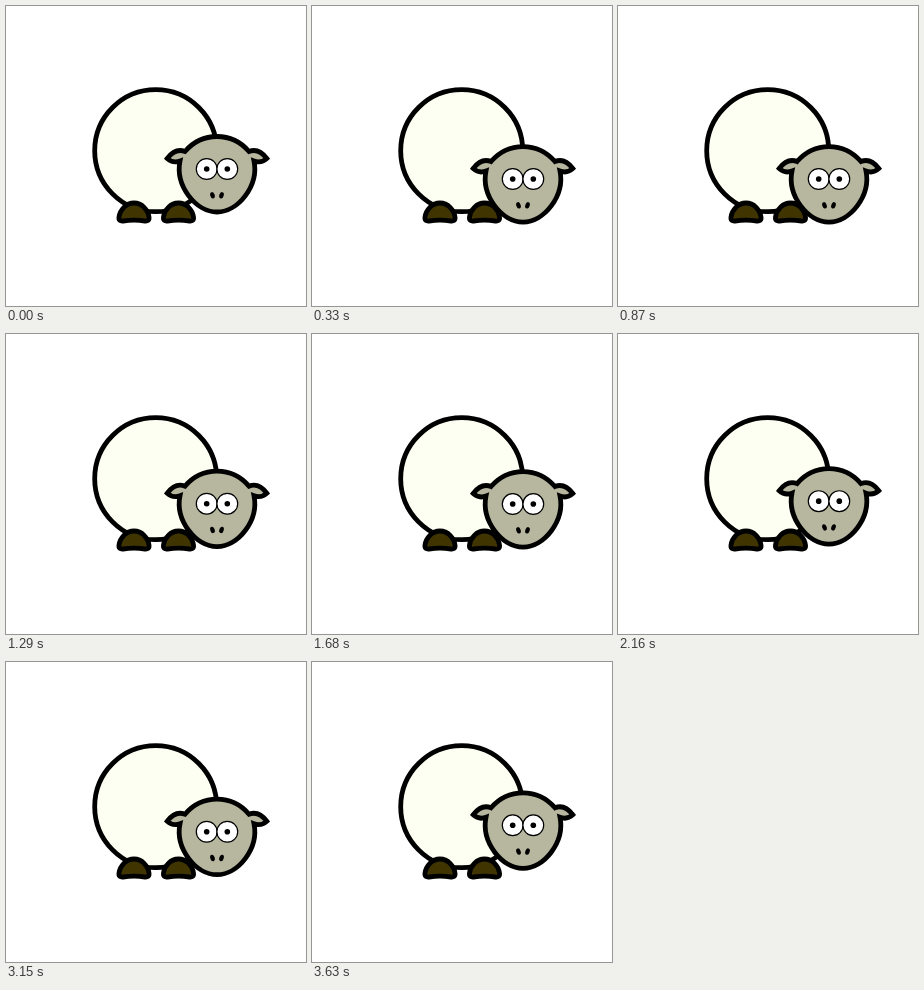
These frames come from a looping animation (300 px wide and 300 px high, 3700 ms). An HTML page:

```html
<!DOCTYPE html>
<html lang="en">
<head>
<meta charset="utf-8">
<title>Chewing sheep</title>
<style>
  html, body { margin: 0; width: 100%; height: 100%; overflow: hidden; background: #fff; }
  svg { display: block; width: 100%; height: 100%; }
</style>
</head>
<body>
<svg viewBox="0 0 300 300" stroke="#000" stroke-width="4.8">
  <defs>
    <path id="foot" fill="#403500"
      d="M113 211C114 204 120 197 128 197C136 197 142 204 143 211
         C143.500 214.500 141.500 215.300 139 215C132 214 124 214 117 215
         C114.500 215.300 112.500 214.500 113 211Z"/>
    <g id="eye">
      <circle r="10.4" fill="#fff" stroke-width="1.2"/>
      <circle r="2.8" fill="#000" stroke="none"/>
    </g>
    <ellipse id="nostril" rx="2.2" ry="3.3" fill="#000" stroke="none"/>
  </defs>

  <circle cx="149.7" cy="144.7" r="61" fill="#fdfff2"/>
  <use href="#foot"/>
  <use href="#foot" x="44.5"/>

  <g id="head">
    <path fill="#b7b7a0"
      d="M179 145.500C188 135 199 130.500 211 130.500C223 130.500 234 135 243 145.500
         C248 143.500 254 143.500 260.800 152.500C257 156 252 156.500 248 155
         C253 180 232 206 211 206C190 206 169 180 174 155
         C170 156.500 165 156 161.200 152.500C168 143.500 174 143.500 179 145.500Z"/>
    <use href="#eye" x="200.700" y="163"/>
    <use href="#eye" x="221.300" y="163"/>
    <use href="#nostril" transform="translate(206.500 189.300) rotate(-18)"/>
    <use href="#nostril" transform="translate(215.500 189.300) rotate(18)"/>
  </g>
</svg>
<script>
  const LOOP = 3700, STEP = 30, LAST = 3630;
  // [time in ms, how far the head hangs down]
  const keys = [
    [0, 0], [300, 10.6], [600, 5], [900, 10.6], [1200, 5], [1500, 10.6],
    [1800, 4.7], [3000, 2.8], [3300, 10.6], [3640, 0]
  ];
  const head = document.getElementById("head");

  function drop(time) {
    const next = keys.findIndex(([end]) => time < end);
    const [t0, y0] = keys[next - 1], [t1, y1] = keys[next];
    return y0 + (y1 - y0) * (time - t0) / (t1 - t0);
  }

  function draw(now) {
    const time = Math.min(LAST, Math.floor(now % LOOP / STEP) * STEP);
    head.setAttribute("transform", `translate(0 ${drop(time)})`);
    requestAnimationFrame(draw);
  }
  draw(performance.now());
</script>
</body>
</html>
```
